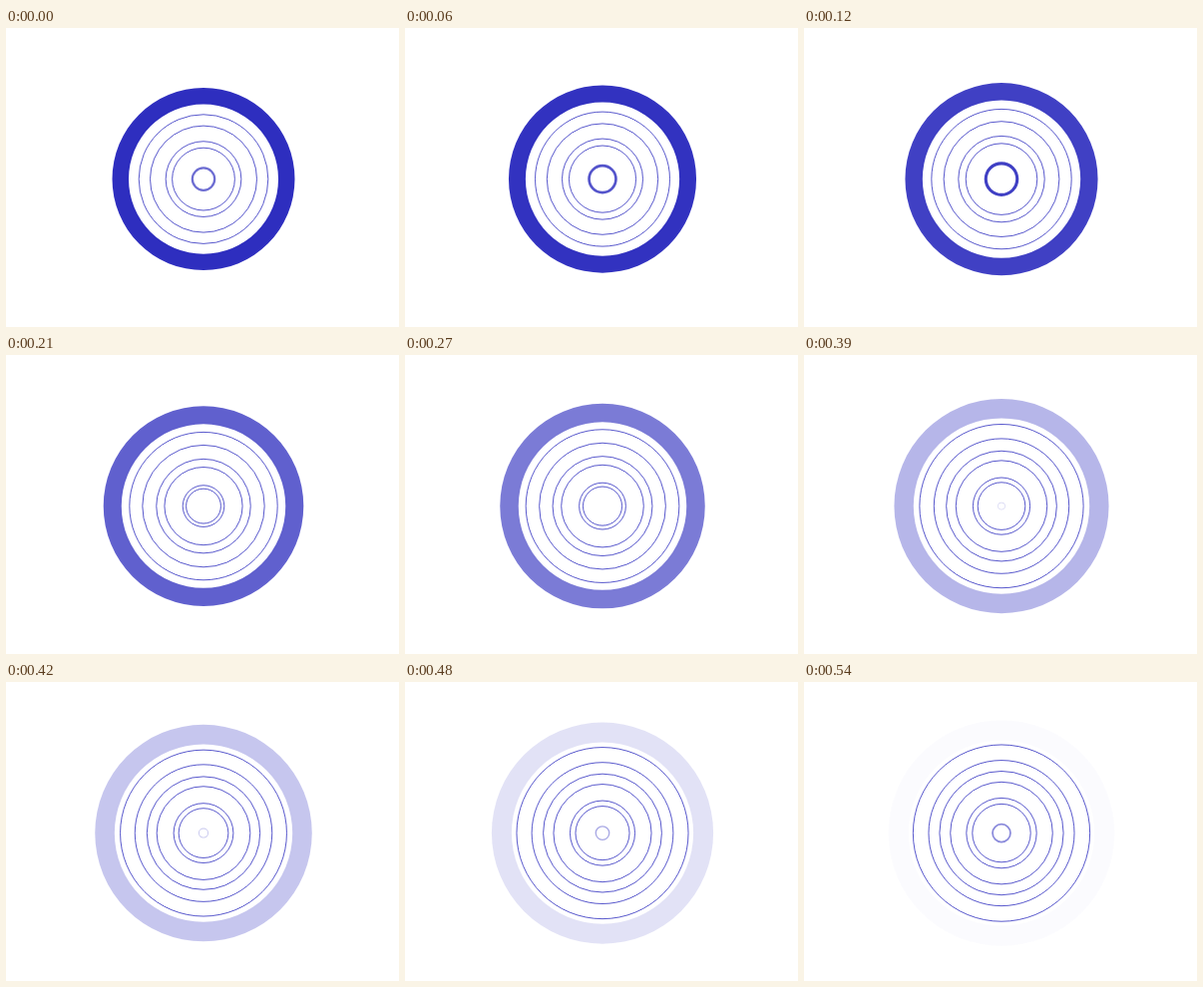
An HTML page with a canvas for the animation above (570 ms loop, 394 px wide and 300 px high).

```html
<!DOCTYPE html>
<html lang="en">
<head>
<meta charset="utf-8">
<title>Ripple rings</title>
<style>
  html, body { margin: 0; width: 100%; height: 100%; overflow: hidden; background: #fff; }
  canvas { display: block; }
</style>
</head>
<body>
<canvas id="stage" width="394" height="300"></canvas>
<script>
const ctx = document.getElementById('stage').getContext('2d');
const LOOP = 570, STEP = 30, SPACING = 600;
const CX = 198, CY = 151.6, INNER = 0.82, MIDDLE = 1020;
const COLOR = '46,46,191';

// Nearly linear growth, slightly slower at both ends.
function radiusAt(age) {
  const x = age - 1000;
  return 56.1 + x * (0.04507 - 1.28e-9 * x * x);
}

// Full in mid-life, fading symmetrically towards birth and death.
function alphaAt(age) {
  const t = Math.max(0, Math.abs(age - MIDDLE) - 780);
  return Math.max(0, 1 - 1.876e-8 * t * t * (360 - t / 3));
}

function circle(r) {
  ctx.moveTo(CX + r, CY);
  ctx.arc(CX, CY, r, 0, Math.PI * 2);
}

function drawRing(age) {
  const r = radiusAt(age);
  if (r <= 0) return;
  ctx.beginPath();
  if (age >= 180 && age < 1800) {
    circle(r - 0.3);
    circle(r * INNER + 0.1);
    ctx.lineWidth = 0.8;
    ctx.strokeStyle = `rgb(${COLOR})`;
    ctx.stroke();
  } else {
    circle(r);
    circle(r * INNER);
    ctx.fillStyle = `rgba(${COLOR},${alphaAt(age)})`;
    ctx.fill('evenodd');
  }
}

function draw() {
  const t = Math.floor(performance.now() % LOOP / STEP) * STEP;
  ctx.clearRect(0, 0, 394, 300);
  for (let k = -1; k <= 3; k++) drawRing(t + k * SPACING);
  requestAnimationFrame(draw);
}
draw();
</script>
</body>
</html>
```
